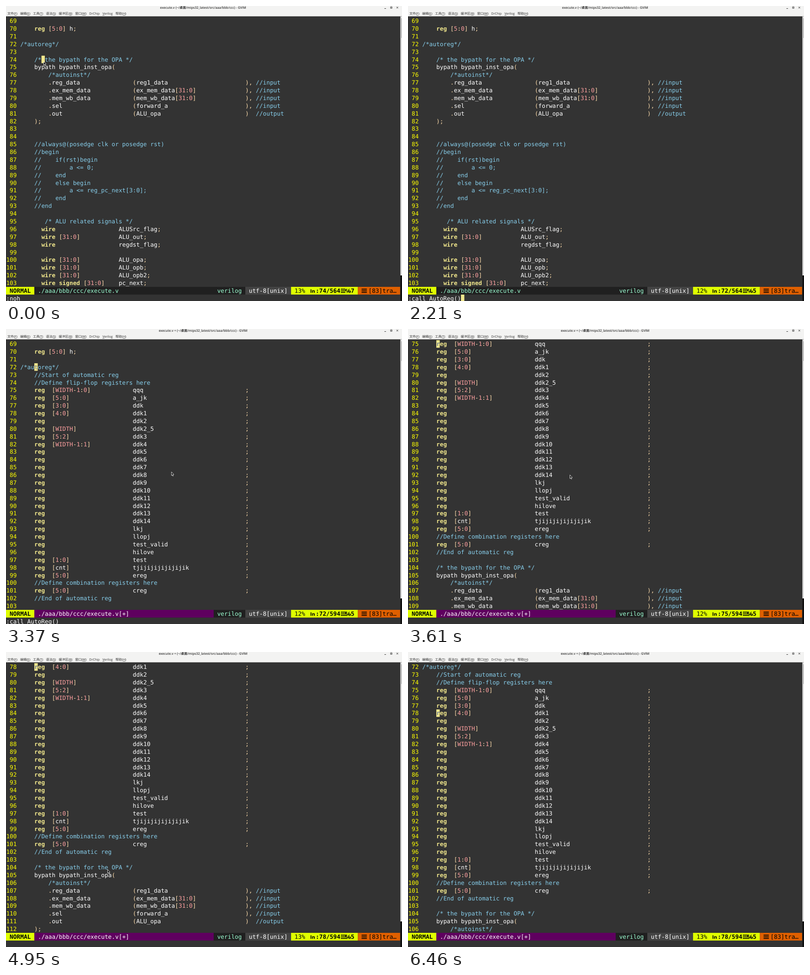
Recreate the animation shown at these times as an HTML page with a canvas. Size 867 by 646 pixels, loop 6930 ms.

```html
<!DOCTYPE html>
<html lang="zh">
<head>
<meta charset="utf-8">
<style>
  html, body { margin: 0; width: 100%; height: 100%; overflow: hidden; background: #333; }
  canvas { display: block; }
</style>
</head>
<body>
<canvas id="stage" width="867" height="646"></canvas>
<script>
const ctx = document.getElementById('stage').getContext('2d');
const LOOP = 6930, CELL = 7.7, ROW = 16.88, LEFT = 0.4, TOP = 24.2, GUTTER = 4, ROWS = 35;
const MONO = '12.79px "DejaVu Sans Mono", monospace';
const UI = '"Open Sans", "Noto Sans CJK SC", "Noto Sans CJK", sans-serif';
const INK = { comment: '#87ceeb', keyword: '#f0e68c', constant: '#ffa0a0', operator: '#ffdead', plain: '#fff' };

// ---- buffer contents ----
const port = (name, net, end = '), //input') =>
  ('        .' + name).padEnd(32) + ('(' + net).padEnd(32) + end;
const wire = (name, type = '') => ('      wire ' + type).padEnd(28) + name + ';';
const reg = (name, range = '') => ('    reg  ' + range).padEnd(32) + name.padEnd(32) + ';';

const head = ['', '    reg [5:0] h;', '', '/*autoreg*/'];
const tail = [
  '',
  '    /* the bypath for the OPA */',
  '    bypath bypath_inst_opa(',
  '        /*autoinst*/',
  port('reg_data', 'reg1_data'),
  port('ex_mem_data', 'ex_mem_data[31:0]'),
  port('mem_wb_data', 'mem_wb_data[31:0]'),
  port('sel', 'forward_a'),
  port('out', 'ALU_opa', ')  //output'),
  '    );', '', '',
  '    //always@(posedge clk or posedge rst)',
  '    //begin',
  '    //    if(rst)begin',
  '    //        a <= 0;',
  '    //    end',
  '    //    else begin',
  '    //        a <= reg_pc_next[3:0];',
  '    //    end',
  '    //end', '',
  '       /* ALU related signals */',
  wire('ALUSrc_flag'), wire('ALU_out', '[31:0]'), wire('regdst_flag'), '',
  wire('ALU_opa', '[31:0]'), wire('ALU_opb', '[31:0]'), wire('ALU_opb2', '[31:0]'),
  wire('pc_next', 'signed [31:0]')
];
const generated = [
  '    //Start of automatic reg',
  '    //Define flip-flop registers here',
  reg('qqq', '[WIDTH-1:0]'), reg('a_jk', '[5:0]'), reg('ddk', '[3:0]'), reg('ddk1', '[4:0]'),
  reg('ddk2'), reg('ddk2_5', '[WIDTH]'), reg('ddk3', '[5:2]'), reg('ddk4', '[WIDTH-1:1]'),
  ...Array.from({ length: 10 }, (_, i) => reg('ddk' + (i + 5))),
  ...['lkj', 'llopj', 'test_valid', 'hilove'].map(name => reg(name)),
  reg('test', '[1:0]'), reg('tjijijijijijijik', '[cnt]'), reg('ereg', '[5:0]'),
  '    //Define combination registers here',
  reg('creg', '[5:0]'),
  '    //End of automatic reg'
];
const FIRST = 69;
const before = [...head, ...tail], after = [...head, ...generated, ...tail];

// ---- timeline ----
const CLICK = 560, TYPE = 2130, ENTER = 2510, POINTER_BACK = 2810;
const WHEEL_DOWN = [3460, 3610, 3750], WHEEL_UP = [4980, 5110];
// mouse glides: start time, end time, destination
const glides = [
  [50, 51, 79, 116], [230, 380, 68, 84], [820, 1140, 381, 296], [3250, 3420, 354, 319],
  [3920, 4170, 161, 433], [4170, 4560, 150, 459], [4620, 4900, 222, 476],
  [5380, 5800, 401, 470], [6010, 6460, 836, 647]
];

function editorState(t) {
  const ticks = times => times.filter(time => time <= t).length;
  const down = FIRST + 3 * ticks(WHEEL_DOWN);
  return {
    modified: t >= ENTER,
    typing: t >= TYPE && t < ENTER,
    first: down - 3 * ticks(WHEEL_UP),
    line: t < CLICK ? 74 : Math.max(72, down), // the cursor is pushed along by the top edge
    col: t < CLICK ? 6 : 4,
    command: t < TYPE ? ':noh' : t < TYPE + 80 ? ':' : t < WHEEL_DOWN[0] ? ':call AutoReg()' : ''
  };
}

function mouseAt(t) {
  let x = 82, y = 121;
  for (const [start, end, toX, toY] of glides) {
    const p = Math.min(1, Math.max(0, (t - start) / (end - start)));
    x += (toX - x) * p;
    y += (toY - y) * p;
  }
  return [x, y];
}

// ---- drawing ----
const colX = col => LEFT + col * CELL;
const rowY = row => TOP + row * ROW;
const fill = (x, y, w, h, color) => { ctx.fillStyle = color; ctx.fillRect(x, y, w, h); };
function text(str, x, y, color, font) {
  ctx.font = font;
  ctx.fillStyle = color;
  ctx.fillText(str, x, y);
}
const cellText = (str, col, row, color, bold) =>
  text(str, colX(col), rowY(row) + 12.9, color, (bold ? 'bold ' : '') + MONO);

const TOKENS = /(?<comment>\/\*.*?\*\/|\/\/.*)|(?<keyword>\b(?:reg|wire|signed)\b)|(?<constant>\b(?:\d+|[A-Z]{2,})\b)|(?<plain>\w+)|(?<operator>\S)/g;
function code(line, row, ink) {
  for (const m of line.matchAll(TOKENS)) {
    const kind = Object.keys(m.groups).find(k => m.groups[k]);
    cellText(m[0], GUTTER + m.index, row, ink || INK[kind], kind === 'keyword');
  }
}

function block(col, row, line = '') {
  ctx.save();
  ctx.beginPath();
  ctx.rect(colX(col), rowY(row), CELL, ROW);
  ctx.clip();
  fill(colX(col), rowY(row), CELL, ROW, '#f0e68c');
  code(line, row, '#708090');
  ctx.restore();
}

function menuBar() {
  let x = 3;
  for (const label of ['文件(F)', '编辑(E)', '工具(T)', '语法(S)', '缓冲区(B)', '窗口(W)', 'DrChip', 'Verilog', '帮助(H)']) {
    text(label, x, 19.3, '#2e2e2e', '7px ' + UI);
    const width = str => ctx.measureText(str).width;
    const key = label.search(/[A-Z]\)|V/);
    if (key >= 0) fill(x + width(label.slice(0, key)), 20.3, width(label[key]), 0.6, '#2e2e2e');
    x += width(label) + 6.2;
  }
}

function windowFrame(modified) {
  fill(0, 0, 867, 22.6, '#f3f3f2');
  ctx.textAlign = 'center';
  text(`execute.v ${modified ? '+ ' : ''}(~/桌面/mips32_latest/src/aaa/bbb/ccc) - GVIM`, 431.5, 5.6, '#333', '600 7px ' + UI);
  ctx.textAlign = 'left';
  menuBar();
  fill(828.5, 5, 3.5, 1, '#333');
  ctx.strokeStyle = '#333';
  ctx.lineWidth = 1;
  ctx.strokeRect(842, 2, 3, 3);
  ctx.stroke(new Path2D('M855 1.7l3.5 3.5m0 -3.5l-3.5 3.5'));
  fill(863.5, 22.6, 4, 567.4, '#e2e2e2');
  fill(863.5, 27, 4, 43, '#c4c4c4');
  fill(863.5, 590, 4, 56, '#111');
}

function bars(x, w) {
  for (let i = 0; i < 3; i++) fill(x, rowY(ROWS) + 4.2 + i * 3.6, w, 1.7, '#000');
}

function statusLine({ modified, line, col }) {
  const total = modified ? 594 : 564, baseline = rowY(ROWS) + 12.9;
  const section = (from, to, color) => fill(from && colX(from), rowY(ROWS), colX(to) - (from && colX(from)), ROW, color);
  const label = (str, column, color = '#000', bold) => cellText(str, column, ROWS, color, bold);
  section(0, 8, '#dfff00');
  section(8, 68, '#202020');
  if (modified) section(8, 59, '#5f005f');
  section(68, 81, '#444');
  section(81, 100, '#dfff00');
  section(100, 112, '#df5f00');
  label('NORMAL', 1, '#000', true);
  label('./aaa/bbb/ccc/execute.v' + (modified ? '[+]' : ''), 9, modified ? '#fff' : '#9cffd3');
  label('verilog', 60, '#9cffd3');
  label('utf-8[unix]', 69, '#fff');
  label(Math.floor(line * 100 / total) + '%', 82);
  text('ln', 666, baseline, '#000', 'bold 10px "DejaVu Sans", sans-serif');
  label(`:${line}/${total}`, 88, '#000', true);
  bars(733, modified ? 13 : 10);
  text('℅', 742.8, baseline, '#000', 'bold 11.5px "DejaVu Sans", sans-serif');
  label(String(col + 1), 98, '#000', true);
  bars(778.5, 11.5);
  label('[83]tra…', 103);
}

const ARROW = new Path2D('M.5 .5V8.5L2.2 7L3.4 9.7L4.6 9.2L3.5 6.5L5.8 6.2Z');
function pointer(t) {
  if (t >= TYPE && t < POINTER_BACK) return;
  ctx.save();
  ctx.translate(...mouseAt(t));
  ctx.fillStyle = '#111';
  ctx.strokeStyle = '#fff';
  ctx.lineWidth = 0.8;
  ctx.fill(ARROW);
  ctx.stroke(ARROW);
  ctx.restore();
}

function draw(t) {
  const state = editorState(t), { modified, typing, first, line, col, command } = state;
  const buffer = modified ? after : before;
  fill(0, 0, 867, 646, '#333');
  for (let row = 0; row < ROWS; row++) {
    cellText(String(first + row).padStart(3), 0, row, '#ff0');
    code(buffer[first + row - FIRST], row);
  }
  if (typing) block(command.length, ROWS + 1);
  else block(GUTTER + col, line - first, buffer[line - FIRST]);
  statusLine(state);
  cellText(command, 0, ROWS + 1, '#fff');
  windowFrame(modified);
  pointer(t);
}

ctx.textRendering = 'geometricPrecision';
const start = performance.now();
function tick() {
  draw((performance.now() - start) % LOOP);
  requestAnimationFrame(tick);
}
tick();
</script>
</body>
</html>
```
